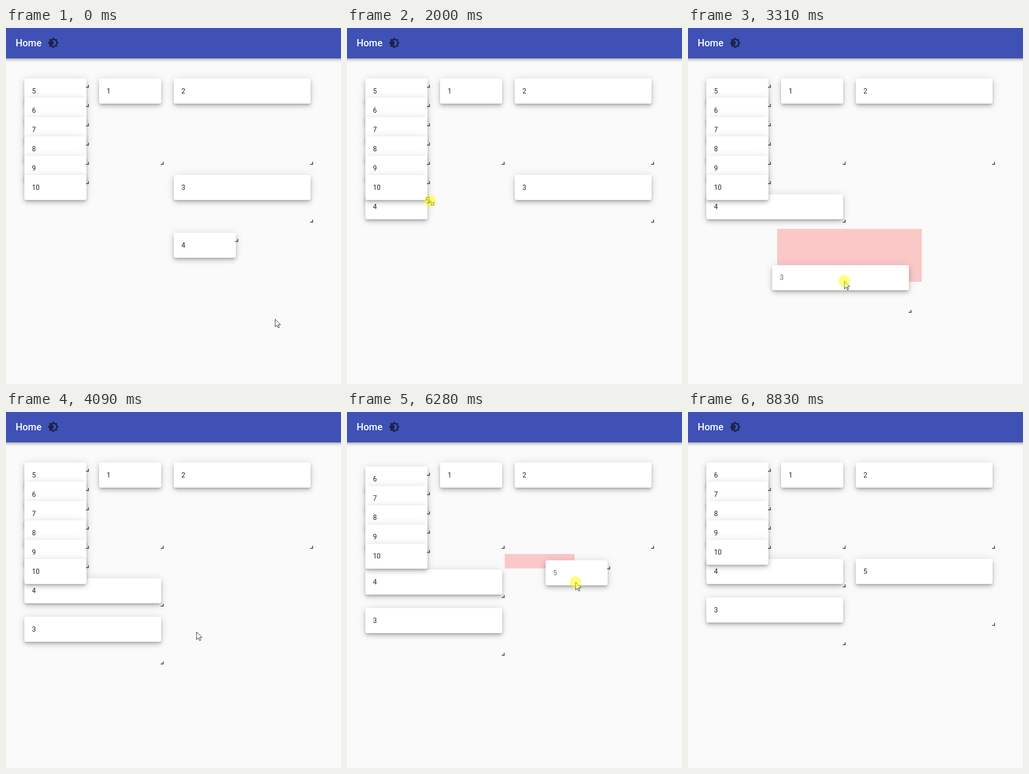
These frames come from a looping animation (695x739 px, 9150 ms). An HTML page:

```html
<!DOCTYPE html>
<html lang="en">
<head>
<meta charset="utf-8">
<title>Grid layout</title>
<style>
  html, body { margin: 0; width: 100%; height: 100%; overflow: hidden; background: #fafafa; }
  body { position: relative; font: 14px/20px Roboto, Arial, sans-serif; color: #212121; }
  header, .item, .card, .grip, #hole, #over { position: absolute; }
  header { left: -20px; right: -20px; top: 0; height: 63px; background: #3f51b5; color: #fff; font-size: 20px; font-weight: 500; line-height: 62px;
    box-shadow: 0 2px 4px -1px rgba(0,0,0,.2), 0 4px 5px rgba(0,0,0,.14), 0 1px 10px rgba(0,0,0,.12); }
  header span { position: absolute; left: 40px; }
  header svg { position: absolute; left: 106px; top: 19px; opacity: .56; }
  .item { left: 0; top: 0; }
  .card { left: 8px; right: 8px; top: 8px; height: 52px; padding: 16px; box-sizing: border-box; border-radius: 4px; background: #fff;
    box-shadow: 0 3px 5px -1px rgba(0,0,0,.2), 0 6px 10px rgba(0,0,0,.14), 0 1px 18px rgba(0,0,0,.12); }
  .grip { right: 3px; bottom: 3px; width: 6px; height: 6px; box-sizing: border-box; border: solid #5a5a5a; border-width: 0 2px 2px 0; }
  .held { z-index: 2; color: #666; }
  #hole { left: 0; top: 0; z-index: 1; background: rgba(255,0,0,.2); }
  #over { left: 0; top: 0; width: 100%; height: 100%; z-index: 3; }
</style>
</head>
<body>
<header>
  <span>Home</span>
  <svg width="24" height="24"><path d="M20 8.69V4h-4.69L12 .69 8.69 4H4v4.69L.69 12 4 15.31V20h4.69L12 23.31 15.31 20H20v-4.69L23.31 12 20 8.69zM12 18c-.89 0-1.74-.2-2.5-.55C11.56 16.5 13 14.42 13 12s-1.44-4.5-3.5-5.45C10.26 6.2 11.11 6 12 6c3.31 0 6 2.69 6 6s-2.69 6-6 6z"/></svg>
</header>
<div id="hole"></div>
<svg id="over">
  <g fill="#fff" stroke="#222" stroke-width="1">
    <path id="arrow" d="M.5 .5V16.5L4.2 13 6.7 18.6 9 17.6 6.6 12H11.5Z"/>
    <path id="sizer" d="M-8-8H-1.5L-4-5.5 5.5 4 8 1.5V8H1.5L4 5.5-5.5-4-8-1.5Z"/>
  </g>
  <circle id="glow" r="12" fill="#ff0" fill-opacity=".5"/>
</svg>
<script>
const LOOP = 9150, SLIDE = 300, HOLE_SLIDE = 120;
const LEFT = 30, TOP = 97, COL = 155, ROW = 40, GAP = 10, COLS = 4;
const $ = id => document.getElementById(id);

// Pointer keys: time, x, y. A time alone means the pointer rests until then.
const path = [[0, 558, 604], [300, 418, 452], [360], [900, 108, 428], [1150], [1750, 172, 359], [2060],
  [2380, 330, 395], [2570], [2900, 497, 338], [3310, 324, 525], [3690, 151, 565], [3800],
  [4090, 395, 457], [4400, 462, 136], [4470], [4720, 459, 296], [5190, 445, 435], [5300],
  [5800, 100, 150], [6060], [6280, 473, 352], [6430, 560, 430], [6810, 440, 365],
  [7400, 482, 319], [7700], [8050, 628, 449], [8250], [8400, 652, 580], [8830, 675, 745]];
path.forEach((k, i) => { if (k.length < 2) k.push(...path[i - 1].slice(1)); });

const gestures = [
  { id: 4, from: 340, to: 1130 },
  { id: 4, from: 2060, to: 2580, resize: true },
  { id: 3, from: 2900, to: 3780 },
  { id: 2, from: 4470, to: 5290 },
  { id: 5, from: 6050, to: 6760 },
  { id: 5, from: 7700, to: 8250, resize: true }
];

// Smooth curve through the keys without overshoot
function pointer(t) {
  let i = path.findIndex(k => k[0] > t) - 1;
  if (i < 0) i = path.length - 2;
  const slope = (j, c) => (path[j + 1][c] - path[j][c]) / (path[j + 1][0] - path[j][0]);
  const tangent = (j, c) => {
    if (j < 1 || j > path.length - 2) return 0;
    const a = slope(j - 1, c), b = slope(j, c);
    return a * b > 0 ? 2 * a * b / (a + b) : 0;
  };
  const d = path[i + 1][0] - path[i][0];
  const u = Math.min(1, (t - path[i][0]) / d), v = 1 - u;
  return [1, 2].map(c =>
    path[i][c] * (1 + 2 * u) * v * v + path[i + 1][c] * u * u * (3 - 2 * u) +
    d * (tangent(i, c) * u * v * v - tangent(i + 1, c) * u * u * v));
}

// cubic-bezier(.25, .1, .25, 1)
function ease(x) {
  if (x <= 0) return 0;
  if (x >= 1) return 1;
  const curve = (s, a, b) => 3 * s * (1 - s) * (1 - s) * a + 3 * s * s * (1 - s) * b + s * s * s;
  let lo = 0, hi = 1;
  for (let i = 0; i < 20; i++) {
    const m = (lo + hi) / 2;
    if (curve(m, .25, .25) < x) lo = m; else hi = m;
  }
  return curve(lo, .1, 1);
}

// Eased box after a list of moves { t, box, jump }
function follow(t, moves, span) {
  let from = moves[0].box, to = from, start = 0;
  const at = time => {
    const k = ease((time - start) / span);
    return from.map((v, i) => v + (to[i] - v) * k);
  };
  for (const m of moves.slice(1)) {
    if (m.t > t) break;
    from = m.jump ? m.box : at(m.t);
    to = m.box;
    start = m.t;
  }
  return at(t);
}

const toBox = ({ c, r, w, h }) => [LEFT + COL * c, TOP + ROW * r, COL * w - GAP, ROW * h - GAP];

function toCell([x, y, w, h]) {
  const cols = Math.max(1, Math.round((w + GAP) / COL));
  const col = Math.round((x - LEFT) / COL);
  return {
    c: Math.max(0, Math.min(COLS - cols, col)), r: Math.max(0, Math.round((y - TOP) / ROW)),
    w: cols, h: Math.max(1, Math.round((h + GAP) / ROW))
  };
}

const overlap = (a, b) => a.c < b.c + b.w && b.c < a.c + a.w && a.r < b.r + b.h && b.r < a.r + a.h;

// Let every cell rise until it meets another; the lead goes first within its row
function pack(cells, lead) {
  const done = {};
  const rank = id => cells[id].r - (id === lead ? .5 : 0);
  const ids = Object.keys(cells).map(Number).sort((a, b) => rank(a) - rank(b));
  for (const id of ids) {
    const cell = { ...cells[id] };
    const free = r => !Object.values(done).some(o => overlap({ ...cell, r }, o));
    while (cell.r > 0 && free(cell.r - 1)) cell.r--;
    while (!free(cell.r)) cell.r++;
    done[id] = cell;
  }
  return done;
}

const items = [];
let cells = {};
function addItem(id, c, r, w, h) {
  const el = document.createElement("div");
  el.className = "item";
  el.innerHTML = `<div class="card">${id}</div><div class="grip"></div>`;
  document.body.insertBefore(el, $("hole"));
  cells[id] = { c, r, w, h };
  items[id] = { el, moves: [{ t: 0, box: toBox(cells[id]) }] };
}
addItem(1, 1, 0, 1, 5);
addItem(2, 2, 0, 2, 5);
addItem(3, 2, 5, 2, 3);
addItem(4, 2, 8, 1, 1);
for (let id = 5; id <= 10; id++) addItem(id, 0, id - 5, 1, 1);

// Play the gestures once to learn when each box has to move
for (const g of gestures) {
  const base = cells, [x, y, w, h] = toBox(base[g.id]), [px, py] = pointer(g.from);
  g.box = t => {
    const [qx, qy] = pointer(t), dx = qx - px, dy = qy - py;
    return g.resize ? [x, y, w + dx, h + dy] : [x + dx, y + dy, w, h];
  };
  g.moves = [{ t: g.from, box: [x, y, w, h] }];
  for (let t = g.from; t < g.to; t += 5) {
    const next = pack({ ...base, [g.id]: toCell(g.box(t)) }, g.id);
    for (const id in next) {
      const box = toBox(next[id]);
      if (String(box) === String(toBox(cells[id]))) continue;
      (Number(id) === g.id ? g : items[id]).moves.push({ t, box });
    }
    cells = next;
  }
  items[g.id].moves.push({ t: g.to, box: g.box(g.to), jump: true }, { t: g.to, box: toBox(cells[g.id]) });
}

function place(el, [x, y, w, h]) {
  el.style.transform = `translate(${x}px,${y}px)`;
  el.style.width = w + "px";
  el.style.height = h + "px";
}
const show = (el, on) => { el.style.display = on ? "" : "none"; };

function draw(t) {
  const active = lead => gestures.find(g => t >= g.from - lead && t < g.to);
  const g = active(0);
  items.forEach(({ el, moves }, id) => {
    const held = !!g && g.id === id;
    place(el, held ? g.box(t) : follow(t, moves, SLIDE));
    el.classList.toggle("held", held);
  });
  show($("hole"), g);
  if (g) place($("hole"), follow(t, g.moves, HOLE_SLIDE));

  const [x, y] = pointer(t).map(Math.round);
  const near = active(300), size = !!near && near.resize;
  show($("arrow"), !size);
  show($("sizer"), size);
  show($("glow"), active(80));
  for (const id of ["arrow", "sizer", "glow"]) {
    const shift = id === "sizer" ? .5 : 0;
    $(id).setAttribute("transform", `translate(${x + shift} ${y + shift})`);
  }
}

function tick() {
  draw(performance.now() % LOOP);
  requestAnimationFrame(tick);
}
tick();
</script>
</body>
</html>
```
